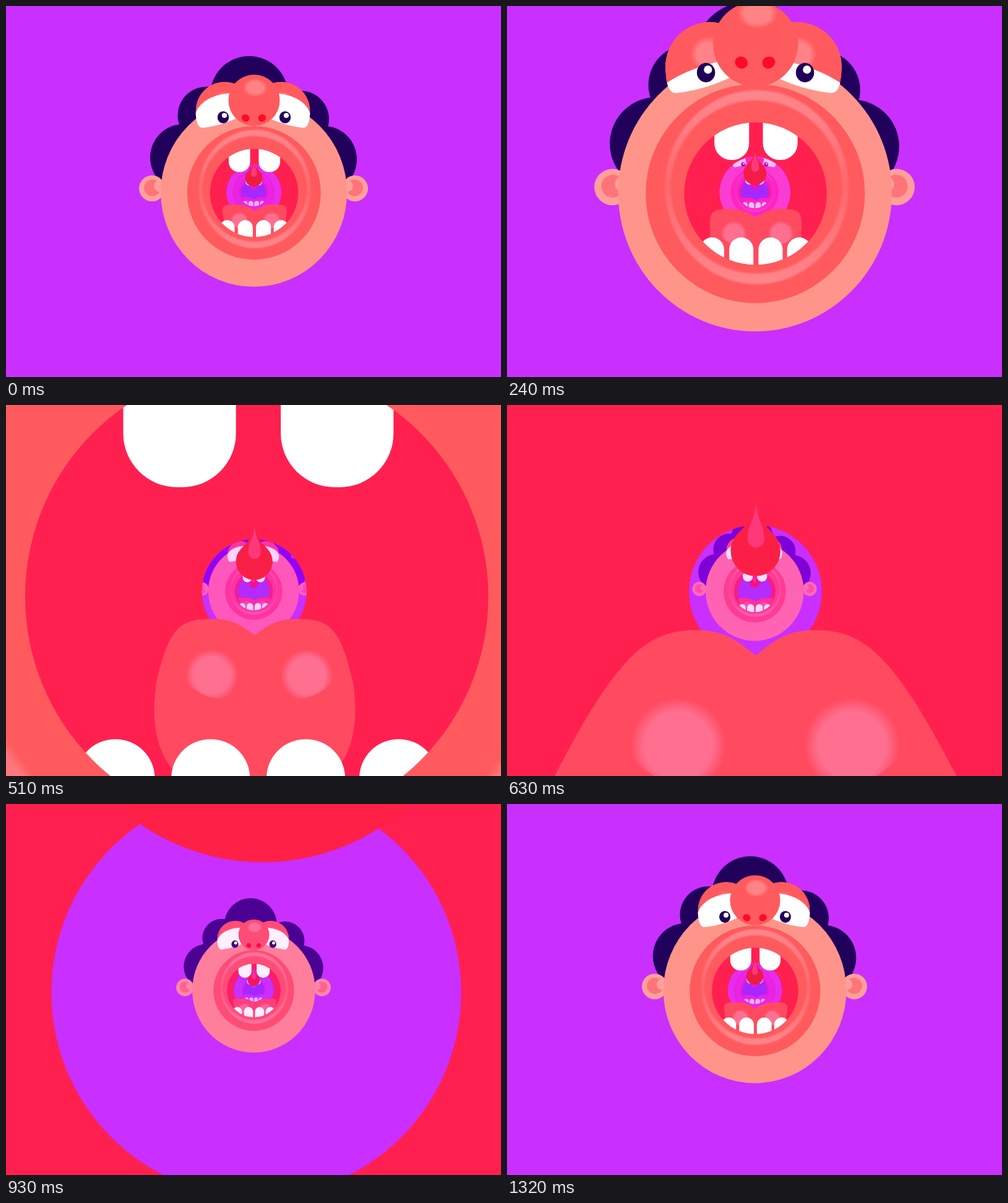
These frames come from a looping animation (800 px wide and 600 px high, 1350 ms). An HTML page with a canvas:

```html
<!DOCTYPE html>
<html>
<head>
<meta charset="utf-8">
<style>
  html, body { margin: 0; width: 100%; height: 100%; overflow: hidden; background: #c92fff; }
  canvas { display: block; }
</style>
</head>
<body>
<canvas id="stage" width="800" height="600"></canvas>
<script>
const ctx = document.getElementById('stage').getContext('2d');
const LOOP = 1350, STEP = 30;
const NEXT_FACE = 1334;           // time between one face and the one in its throat
const CX = 400, CY = 300.5;       // vanishing point
const PURPLE = '#c92fff', INK = '#20005a', SKIN = '#ff958a', CORAL = '#ff5a5d', WHITE = '#ffffff';

const clamp = v => Math.min(1, Math.max(0, v));
const rgb = hex => [1, 3, 5].map(i => parseInt(hex.slice(i, i + 2), 16));
const mix = (a, b, k) => {
  const to = rgb(b);
  return '#' + rgb(a).map((v, i) =>
    Math.round(v + (to[i] - v) * clamp(k)).toString(16).padStart(2, '0')).join('');
};

function ellipse(x, y, rx, ry, color) {
  ctx.beginPath();
  ctx.ellipse(x, y, rx, ry, 0, 0, 7);
  ctx.fillStyle = color;
  ctx.fill();
}
const circle = (x, y, r, color) => ellipse(x, y, r, r, color);

function glow(x, y, r, color, core = 0.6) {
  const g = ctx.createRadialGradient(x, y, 0, x, y, r);
  g.addColorStop(0, color);
  g.addColorStop(core, color);
  g.addColorStop(1, color + '00');
  circle(x, y, r, g);
}

function shape(path, color) {
  ctx.fillStyle = color;
  ctx.fill(new Path2D(path));
}

function drop(x, tip, y, r, color) {
  const bend = tip + (y - tip) * 0.55;
  shape(`M${x} ${tip} C${x + 1} ${bend} ${x + r} ${bend} ${x + r} ${y}
    A${r} ${r} 0 0 1 ${x - r} ${y} C${x - r} ${bend} ${x - 1} ${bend} ${x} ${tip}`, color);
}

// Draws one face at its own age; a layer passes the camera when age reaches its depth.
function drawFace(age) {
  if (age < -1900) return;

  const haze = age < 0 ? clamp(0.62 * (-age / 1094) ** 1.4) : 0;
  const hazeColor = mix('#ff00ff', PURPLE, clamp((-age - 1000) / 700));
  const tint = (color, k = 1) => mix(color, hazeColor, haze * k);
  const ease = (a, b) => { const x = clamp((age - a) / (b - a)); return x * x * (3 - 2 * x); };
  const white = tint(WHITE, 0.4), coral = tint(CORAL);

  function layer(depth, draw) {
    const d = depth - age;
    if (d < 4) return;
    ctx.save();
    ctx.translate(CX, CY);
    ctx.scale(depth / d, depth / d);
    draw(depth / d);
    ctx.restore();
  }
  function clipCircle(depth, x, y, r) {
    const d = depth - age;
    if (d < 4) return;
    const s = depth / d;
    ctx.beginPath();
    ctx.arc(CX + x * s, CY + y * s, r * s, 0, 7);
    ctx.clip();
  }
  function fillAll(color) {
    ctx.fillStyle = color;
    ctx.fillRect(0, 0, 800, 600);
  }

  function eye(lid) {
    ctx.save();
    const outline = 'M-93.5 -131 A47 47 0 0 1 0.5 -131 L0 -134 Q-40 -108 -82 -103.5 Q-93 -102.5 -93.5 -131Z';
    ctx.clip(new Path2D(outline));
    shape(outline, coral);
    glow(-48, -144, 19, tint('#ff8286'), 0.65);
    shape(`M-95 ${-124 + 12 * lid} Q${-84 + 14 * lid} ${-158 + 28 * lid} -30 ${-160 + 22 * lid}
      L5 ${-162 + 22 * lid} V-90 H-95Z`, white);
    ctx.restore();
  }

  function tongue() {
    if (age > 880) return;
    const color = tint('#ff4a60');
    for (const m of [-1, 1]) {
      const at = (x, y, depth) => {
        const s = Math.min(16, depth / Math.max(1, depth - age));
        return `${CX + 2 + m * x * s} ${CY + y * s} `;
      };
      shape('M' + at(-0.4, 30.8, 891) +
        'C' + at(6, 27, 900) + at(14, 20.5, 930) + at(30, 20.5, 930) +
        'C' + at(54, 20.5, 930) + at(54, 22, 840) + at(50, 46, 745) +
        'C' + at(50, 66, 720) + at(42, 88, 690) + at(-0.4, 88, 690) + 'Z', color);
    }
    layer(775, () => {
      for (const [x, m] of [[-23, 1], [29.5, -1]]) {
        ctx.save();
        ctx.beginPath();
        ctx.arc(x + 6 * m, 33.8, 26, 0, 7);
        ctx.clip();
        glow(x, 46.8, 14.5, tint('#ff7090'), 0.7);
        ctx.restore();
      }
    });
  }

  function mouth() {
    ctx.save();
    clipCircle(630, 1, 1.8, 71.3);
    fillAll(mix('#ff2050', '#e818d8', haze * 1.3));

    ctx.save();
    clipCircle(1074, 0.6, 0.6, 44.4);
    fillAll(mix(PURPLE, '#a428ff', haze * 1.5));
    drawFace(age - NEXT_FACE);
    ctx.restore();

    layer(969, () => {
      drop(0.6, -50, -22.3, 14, tint(mix('#ec1c44', '#ff2048', age / 780)));
      drop(0.8, -50, -29.1, 4.7, tint('#ff387a'));
    });
    tongue();
    layer(630, () => {
      ctx.beginPath();
      for (const x of [-40.1, 8.4]) ctx.roundRect(x, -95, 34.7, 63.1, 16.6);
      for (const x of [-54.6, -25.3, 4, 32.6]) ctx.roundRect(x, 45.7, 24.2, 60, 12);
      ctx.fillStyle = white;
      ctx.fill();
    });
    ctx.restore();
  }

  layer(840, () => {
    const hair = mix(INK, '#9500f5', haze * 2.4);
    for (const [x, y, r] of [[-7, -156.5, 63], [-76, -123.5, 46.5], [-113, -55.5, 54],
                             [76, -117.5, 46], [113, -52.5, 54]]) circle(x, y, r, hair);
    for (const m of [-1, 1]) {
      circle(m * 164, -5.5, 21, tint('#ffa09a'));
      circle(m * 163.5, -6.5, 13.3, tint('#ff7479'));
      circle(m * 152, -9, 9, tint('#ffa09a'));
    }
  });

  layer(785 - 0.14 * Math.max(0, age), () => ellipse(0.6, 1.2, 150.5, 152.4, tint(SKIN)));

  layer(682, () => {
    const lid = ease(60, 220) - 1.3 * ease(240, 360);
    eye(lid);
    ctx.translate(-2, 0);
    ctx.scale(-1, 1);
    eye(lid);
  });
  layer(640, () => {
    for (const x of [-49, 51]) {
      ellipse(x, -120.5, 9.2, 9.8, tint(INK));
      circle(x + 2, -123.5, 4.1, white);
    }
  });

  layer(615, scale => {
    circle(0.8, 1.7, 108, coral);
    const shine = tint('#ff868c');
    const g = ctx.createLinearGradient(0, -100, 0, 91);
    [[0, 'ff'], [0.15, 'dd'], [0.5, '55'], [0.85, 'cc'], [1, 'ff']]
      .forEach(([stop, alpha]) => g.addColorStop(stop, shine + alpha));
    ctx.filter = `blur(${Math.min(8, scale * 1.1)}px)`;
    ctx.beginPath();
    ctx.ellipse(2.2, -4.6, 90.5, 95.7, 0, 0, 7);
    ctx.closePath();
    ctx.ellipse(1.8, -4.8, 84.5, 85.4, 0, 0, 7);
    ctx.fillStyle = g;
    ctx.fill('evenodd');
    ctx.filter = 'none';
  });

  layer(608, () => {
    const tilt = ease(0, 240), lift = 10.7 * tilt;
    ctx.translate(0, 3.5 * tilt);
    circle(1, -148, 41.5, coral);
    ctx.save();
    ctx.translate(3, -168.5 - lift * 0.9);
    ctx.scale(1, 0.75);
    glow(0, 0, 20, tint('#ff8285'), 0.65);
    ctx.restore();
    for (const m of [-1, 1]) {
      ctx.save();
      ctx.translate(0.5 + m * 13.4, -119.3 - lift);
      ctx.rotate(-m * 0.5);
      ellipse(0, 0, 6.4, 5.8, tint('#ff0a28'));
      ctx.restore();
    }
  });

  mouth();
}

function frame() {
  const t = Math.floor(performance.now() % LOOP / STEP) * STEP;
  ctx.fillStyle = PURPLE;
  ctx.fillRect(0, 0, 800, 600);
  drawFace(t);
  requestAnimationFrame(frame);
}
frame();
</script>
</body>
</html>
```
